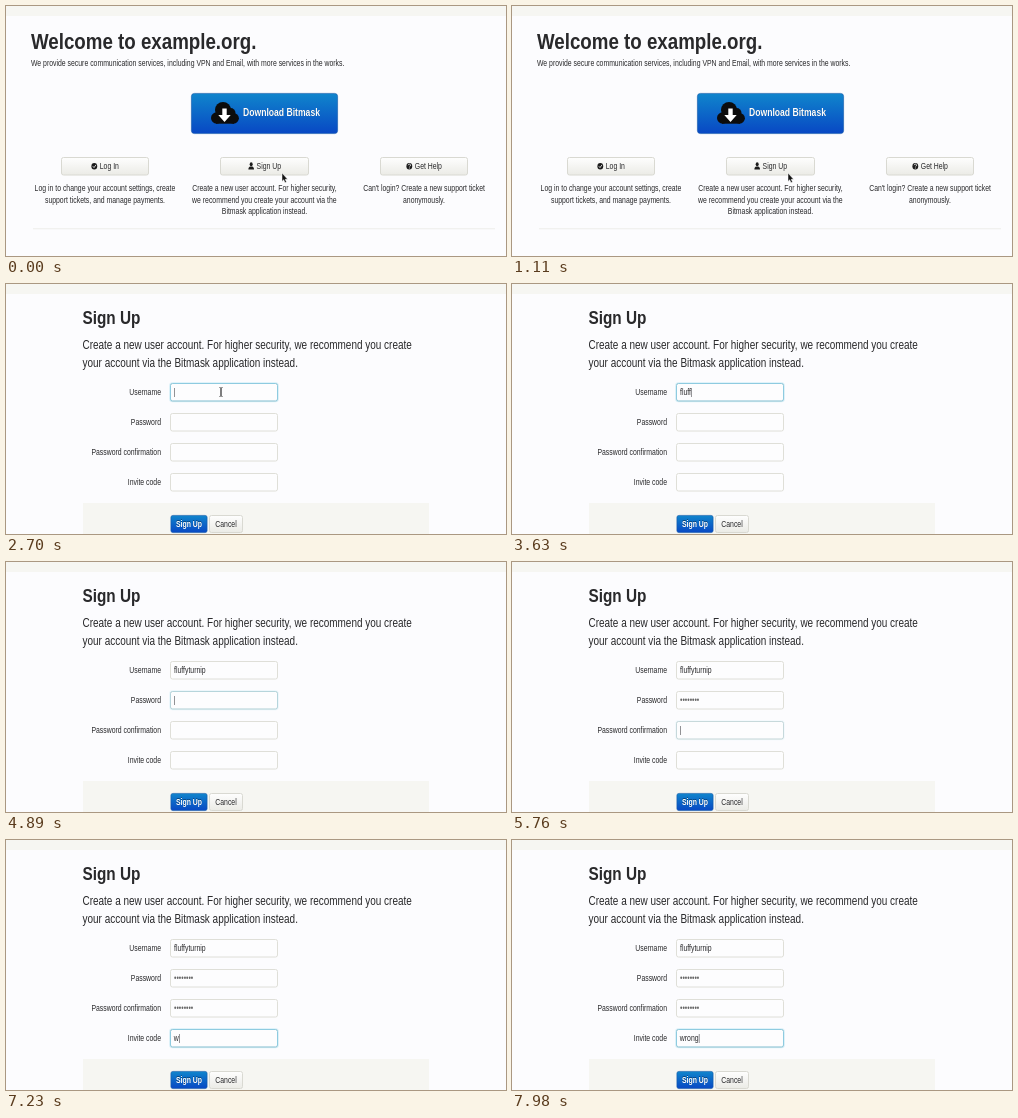
Animation of 500x250 px, one loop 8000 ms. Source, as an HTML page:

```html
<!DOCTYPE html>
<html lang="en">
<head>
<meta charset="utf-8">
<title>Sign up</title>
<style>
  html, body { margin: 0; width: 100%; height: 100%; overflow: hidden; background: #fcfcfe; }
  svg { display: block; width: 100%; height: 100%; }

  /* The whole page is shown slightly squeezed, so all type is too. */
  text {
    font: 8.4px "Liberation Sans", Arial, sans-serif;
    fill: #29292b;
    transform: scaleX(.82);
    transform-box: fill-box;
    transform-origin: left;
  }
  .mid { text-anchor: middle; transform-origin: center; }
  .end { text-anchor: end; transform-origin: right; }
  .h1 { font-size: 22.85px; font-weight: bold; }
  .h2 { font-size: 18.7px; font-weight: bold; }
  .lead { font-size: 12.17px; }
  .big { font-size: 10.5px; }
  .white { fill: #fff; font-weight: bold; text-shadow: 0 -.5px .5px #0006; }
  .secret { fill: #666; }

  .bar { fill: #f6f6f2; }
  .btn { fill: url(#pale); stroke: #d9d9d2; }
  .primary { fill: url(#blue); stroke: #1458a8; stroke-width: .6; }
  .box { fill: #fdfdfe; stroke: #dfdfd8; }
  .glow { fill: none; stroke: #bfe6f4; stroke-width: 2.6; }
  .ring { fill: none; stroke: #8ecbe0; }
  .caret { stroke: #77777a; stroke-width: .8; }

  #home, #form, .shape { animation: 8s step-end infinite; }
  #home { animation-name: home; }
  #form { animation-name: form; }
  #arrow { animation-name: arrow; }
  #hand { animation-name: hand; }
  #beam { animation-name: beam; }
  #pointer { animation: move 8s ease-in-out infinite; }

  @keyframes home { 0% { visibility: visible } 21.25%, 100% { visibility: hidden } }
  @keyframes form { 0% { visibility: hidden } 21.25%, 100% { visibility: visible } }
  @keyframes arrow { 0% { visibility: visible } 16.5%, 100% { visibility: hidden } }
  @keyframes hand { 0% { visibility: hidden } 16.5% { visibility: visible } 27%, 100% { visibility: hidden } }
  @keyframes beam { 0% { visibility: hidden } 27% { visibility: visible } 39%, 100% { visibility: hidden } }
  @keyframes move {
    0%, 14.5% { transform: translate(276px, 167px) }
    18%, 25% { transform: translate(266px, 164px) }
    29%, 100% { transform: translate(215px, 108px) }
  }
</style>
</head>
<body>
<svg viewBox="0 0 500 250" preserveAspectRatio="none">
  <defs>
    <linearGradient id="blue" x2="0" y2="1">
      <stop stop-color="#1085cc"/><stop offset="1" stop-color="#0848c4"/>
    </linearGradient>
    <linearGradient id="pale" x2="0" y2="1">
      <stop stop-color="#fefefe"/><stop offset="1" stop-color="#ebebe6"/>
    </linearGradient>
  </defs>
  <rect width="500" height="250" fill="#fcfcfe"/>
  <rect class="bar" width="500" height="10"/>

  <g id="home">
    <text class="h1" x="25" y="42.7">Welcome to example.org.</text>
    <text x="25" y="60.5">We provide secure communication services, including VPN and Email, with more services in the works.</text>

    <rect class="primary" x="185.4" y="87.4" width="146.2" height="40.2" rx="3"/>
    <g fill="#0c0c0c">
      <circle cx="210.7" cy="112" r="5.7"/>
      <circle cx="217" cy="104" r="8"/>
      <circle cx="224.5" cy="107" r="5"/>
      <circle cx="227.5" cy="112.3" r="5.4"/>
      <rect x="210" y="107" width="18" height="10.7"/>
    </g>
    <path d="M216.3 102.5h4.4v6.5h4l-6.2 7-6.2-7h4z" fill="#fff"/>
    <text class="big white" x="237" y="110.3">Download Bitmask</text>

    <rect class="btn" x="55.5" y="151.5" width="87" height="17.5" rx="2"/>
    <rect class="btn" x="214.5" y="151.5" width="88" height="17.5" rx="2"/>
    <rect class="btn" x="374.5" y="151.5" width="87" height="17.5" rx="2"/>

    <g fill="#1c1c1c">
      <ellipse cx="88.3" cy="160.3" rx="2.9" ry="3.3"/>
      <ellipse cx="245.2" cy="158.2" rx="1.5" ry="2"/>
      <path d="M242.4 163.6q0-3 2-3.2h1.6q2 .2 2 3.2z"/>
      <ellipse cx="403.3" cy="160.3" rx="2.9" ry="3.3"/>
    </g>
    <g fill="none" stroke="#fff" stroke-width=".8">
      <path d="M86.8 160.2l1.2 1.4 2-2.8"/>
      <path d="M402.2 159.2q.2-1.1 1.2-1.1t1.1 1-1.1 1.8M403.4 161.7v.8"/>
    </g>
    <text x="93.8" y="163.3">Log In</text>
    <text x="250.6" y="163.3">Sign Up</text>
    <text x="408.8" y="163.3">Get Help</text>

    <text class="mid" x="99" y="185">Log in to change your account settings, create</text>
    <text class="mid" x="99" y="196.8">support tickets, and manage payments.</text>
    <text class="mid" x="258.5" y="185">Create a new user account. For higher security,</text>
    <text class="mid" x="258.5" y="196.8">we recommend you create your account via the</text>
    <text class="mid" x="258.5" y="208.5">Bitmask application instead.</text>
    <text class="mid" x="418" y="185">Can't login? Create a new support ticket</text>
    <text class="mid" x="418" y="196.8">anonymously.</text>
    <path d="M27 222.8H489" stroke="#ededea"/>
  </g>

  <g id="form">
    <text class="h2" x="76.5" y="40.5">Sign Up</text>
    <text class="lead" x="76.5" y="65.1">Create a new user account. For higher security, we recommend you create</text>
    <text class="lead" x="76.5" y="83.1">your account via the Bitmask application instead.</text>
    <g id="fields"></g>
    <rect class="bar" x="77" y="219" width="346" height="31"/>
    <rect class="primary" x="164.9" y="231.4" width="36.2" height="17.2" rx="2"/>
    <text class="mid white" x="183" y="243">Sign Up</text>
    <rect class="btn" x="203.5" y="231.5" width="33" height="17" rx="2"/>
    <text class="mid" x="220" y="243">Cancel</text>
  </g>

  <g id="pointer">
    <path id="arrow" class="shape" d="M0 0v8.4l1.7-1.6 1.3 3 1.5-.7-1.3-2.8h2.4z" fill="#111" stroke="#fff" stroke-width=".5"/>
    <path id="hand" class="shape" d="M-.8 .8q.8-1.3 1.6 0v3.2l4 1q1 .3 .9 1.6l-.6 2.6v1.6h-5l-2.8-4q-.5-1.4 .6-1.2l1.3 1z" fill="#fff" stroke="#111" stroke-width=".8"/>
    <path id="beam" class="shape" d="M-1.6-4.5q1.6 0 1.6 1v7q0 1-1.6 1M1.6-4.5q-1.6 0-1.6 1v7q0 1 1.6 1" fill="none" stroke="#222" stroke-width=".7"/>
  </g>
</svg>
<script>
  const LOOP = 8000, SQUEEZE = 0.82, LEFT = 168;
  const secret = '•'.repeat(8);
  const fields = [
    { label: 'Username', text: 'fluffyturnip', focus: 2450, type: 3150, step: 115 },
    { label: 'Password', text: secret, focus: 4790, type: 5000, step: 85 },
    { label: 'Password confirmation', text: secret, focus: 5700, type: 5850, step: 85 },
    { label: 'Invite code', text: 'wrong', focus: 6800, type: 7200, step: 140 }
  ];

  fields.forEach((field, i) => {
    const y = 100 + 30 * i;
    const box = name => `<rect class="${name}" x="164.5" y="${y - .5}" width="107" height="17.5" rx="2"/>`;
    const group = document.createElementNS('http://www.w3.org/2000/svg', 'g');
    group.innerHTML = `<text class="end" x="155" y="${y + 11.3}">${field.label}</text>
      ${box('glow')}${box('box')}${box('ring')}
      <text class="value ${field.text === secret ? 'secret' : ''}" x="${LEFT}" y="${y + 11.3}"></text>
      <path class="caret" d="M0 ${y + 4}v9"/>`;
    document.getElementById('fields').append(group);
    for (const part of ['glow', 'ring', 'value', 'caret']) field[part] = group.querySelector('.' + part);
    field.blur = fields[i + 1]?.focus ?? LOOP;
  });

  const clamp = (v, max) => Math.max(0, Math.min(max, v));

  function render(t) {
    for (const f of fields) {
      const count = clamp(Math.floor((t - f.type) / f.step) + 1, f.text.length);
      const lastEdit = count ? f.type + (count - 1) * f.step : f.focus;
      const focused = t >= f.focus && t < f.blur;
      const light = focused ? clamp((t - f.focus) / 200, 1) : 0;
      const caretOn = focused && (t - lastEdit) % 1000 < 500;
      f.value.textContent = f.text.slice(0, count);
      f.glow.style.opacity = light * .6;
      f.ring.style.opacity = light;
      f.caret.style.opacity = caretOn ? 1 : 0;
      const width = count ? f.value.getComputedTextLength() * SQUEEZE : 0;
      f.caret.setAttribute('transform', `translate(${LEFT + .5 + width} 0)`);
    }
  }

  let start;
  function tick(now) {
    start ??= now;
    render((now - start) % LOOP);
    requestAnimationFrame(tick);
  }
  requestAnimationFrame(tick);
</script>
</body>
</html>
```
